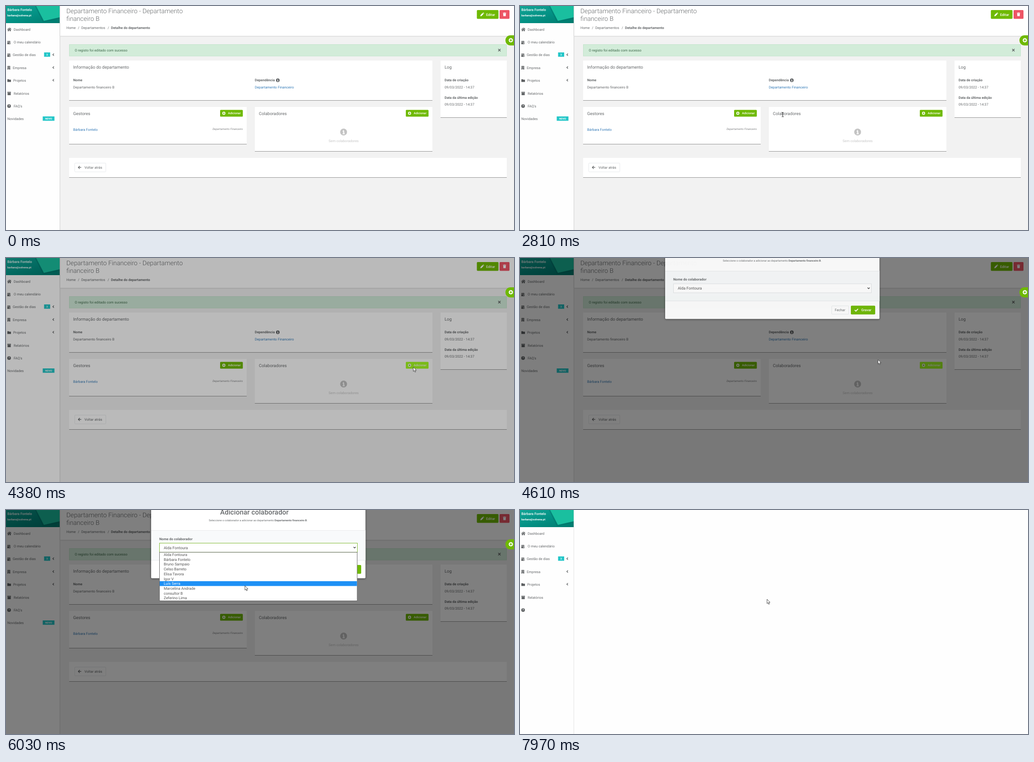
Write an HTML page that moves like this. It is 1127 by 497 pixels and loops after 8000 ms.

```html
<!DOCTYPE html>
<html lang="pt">
<head>
<meta charset="utf-8">
<title>Detalhe do departamento</title>
<style>
html, body { margin: 0; width: 100%; height: 100%; overflow: hidden; background: #fefefe; }
svg { display: block; }
text { font: 7.7px Roboto, sans-serif; fill: #676a6c; text-rendering: geometricPrecision; white-space: pre; }
.b { font-weight: 700; font-size: 7.6px; }
.h1 { font-size: 14.2px; font-weight: 300; }
.h2 { font-size: 9.5px; }
.link { fill: #337ab7; }
.w { fill: #fff; font-weight: 500; }
.add { font-size: 6.6px; }
.badge { font-size: 5.6px; font-weight: 700; fill: #fff; text-anchor: middle; }
.mid { text-anchor: middle; }
.opt { font-size: 8.4px; fill: #555; }
.card { fill: #fff; filter: drop-shadow(0 1px .5px #0006); }
.green { fill: #6fb903; }
.teal { fill: #23c6c8; }
.box { fill: #fff; stroke: #e7eaec; }
.ico { fill: #5d6062; }
.line { fill: none; stroke: #5d6062; stroke-width: 1.3; }
</style>
</head>
<body>
<svg width="1127" height="497" viewBox="0 0 1127 497">
<defs>
  <linearGradient id="teal" x2="1" y2="1">
    <stop stop-color="#12a596"/><stop offset=".5" stop-color="#039184"/><stop offset="1" stop-color="#00796d"/>
  </linearGradient>
  <g id="cal"><path fill-rule="evenodd" d="M-3.4-2.8H-2.2V-4H-1V-2.8H1V-4H2.2V-2.8H3.4V-1.2H-3.4ZM-3.4-.6H3.4V3.8H-3.4ZM.6 1V2.6H2.2V1Z"/></g>
  <path id="chev" class="line" d="M1.4-2.4L-1.2 0 1.4 2.4"/>
  <g id="plus"><circle r="3.4" fill="#fff"/><path d="M-2 0H2M0-2V2" stroke="#6fb903" stroke-width="1.2"/></g>
  <g id="info"><circle r="4"/><path d="M-.2-2.3V-1M-1-.4H.2V2M-1.2 2H1.3" stroke="#fff" stroke-width="1.1" fill="none"/></g>
</defs>

<rect width="1127" height="497" fill="#fefefe"/>
<rect x="119" width="1" height="497" fill="#e2e2e2"/>
<g id="side">
  <rect width="119" height="38" fill="url(#teal)"/>
  <path d="M64 0L82 36 119 29V0Z" fill="#00695f" opacity=".3"/>
  <path d="M67 0L84 33 119 25V0Z" fill="#1abf9f"/>
  <text x="3" y="10.7" class="w">Bárbara Fontelo</text>
  <text x="3" y="22.6" class="w" style="font-size:5.9px;font-weight:700">barbara@solvena.pt</text>
  <g class="ico">
    <path transform="translate(7.3 52)" d="M-4.7 0L0-4 2.4-2V-3.6H3.5V-1L4.7 0 4 .8 0-2.6-4 .8ZM-3.2 1L0-1.7 3.2 1V4H.9V1.6H-.9V4H-3.2Z"/>
    <use href="#cal" x="6.3" y="81"/>
    <use href="#cal" x="6.3" y="109"/>
    <path transform="translate(6.3 137)" fill-rule="evenodd" d="M-3-4H3V4H-3ZM-1.8-2.8V-1.6H-.6V-2.8ZM.6-2.8V-1.6H1.8V-2.8ZM-1.8-.6V.6H-.6V-.6ZM.6-.6V.6H1.8V-.6ZM-.7 1.8V4H.7V1.8Z"/>
    <path d="M3 162.4H6.2L7.2 163.4H11V168.6H3Z"/>
    <path d="M3 190.4H11V192.4H3ZM3.5 193H10.5V197.7H3.5Z"/>
    <circle cx="6.8" cy="222" r="4"/>
  </g>
  <text x="6.8" y="224.3" class="badge" style="font-size:6.4px">?</text>
  <text x="17" y="54.7">Dashboard</text>
  <text x="17" y="83.2">O meu calendário</text>
  <text x="15" y="111.3">Gestão de dias</text>
  <text x="15" y="139.8">Empresa</text>
  <text x="16" y="167.9">Projetos</text>
  <text x="17" y="196.6">Relatórios</text>
  <rect x="84.5" y="103" width="13.5" height="9.6" class="teal"/>
  <text x="91" y="109.9" class="badge">3</text>
  <use href="#chev" x="105" y="108"/>
  <use href="#chev" x="105" y="136.5"/>
  <use href="#chev" x="105" y="164.7"/>
</g>

<g id="page">
  <text x="17" y="224.8">FAQ's</text>
  <text x="3" y="253.2">Novidades</text>
  <rect x="81.5" y="245" width="26" height="9.6" class="teal"/>
  <text x="94.5" y="251.8" class="badge">NOVO</text>

  <rect x="120" width="1007" height="497" fill="#f2f2f2"/>
  <rect x="120" width="1007" height="66.5" fill="#fff" style="filter:drop-shadow(0 .6px .8px #0005)"/>
  <rect x="119" width="1.2" height="497" fill="#d5d5d5"/>
  <text x="134" y="15.7" class="h1">Departamento Financeiro - Departamento</text>
  <text x="134" y="32.7" class="h1">financeiro B</text>
  <text x="134" y="51.2">Home</text>
  <text x="159.5" y="51.2">/</text>
  <text x="167" y="51.2">Departamentos</text>
  <text x="225.5" y="51.2">/</text>
  <text x="233" y="51.2" class="b">Detalhe do departamento</text>

  <rect x="1044.6" y="9" width="48" height="19.6" rx="1.8" class="green"/>
  <path d="M1052.3 22.7L1052.8 20 1057.2 15.6 1059.4 17.8 1055 22.2ZM1057.8 15L1058.8 14.2 1060.8 16.2 1060 17.2Z" fill="#fff"/>
  <text x="1065" y="21.5" class="w">Editar</text>
  <rect x="1095" y="9" width="22" height="19.6" rx="1.8" fill="#ed5565"/>
  <path d="M1102.5 15H1104.7V14.4H1107.3V15H1109.5V16.2H1102.5ZM1103 16.8H1109L1108.6 22.6H1103.4Z" fill="#fff"/>

  <rect x="140.5" y="85.5" width="970" height="25.5" fill="#d2ecd9" stroke="#c1e4ca"/>
  <text x="152.5" y="100.8" style="fill:#3f6a4c">O registo foi editado com sucesso</text>
  <path d="M1092 95.3L1097.2 100.5M1097.2 95.3L1092 100.5" class="line" style="stroke-width:1.5"/>

  <rect x="140" y="121" width="806" height="88" class="card"/>
  <text x="149" y="138.8" class="h2">Informação do departamento</text>
  <text x="149" y="167.4" class="b">Nome</text>
  <text x="149" y="182.7">Departamento financeiro B</text>
  <text x="552" y="167.4" class="b">Dependência</text>
  <use href="#info" x="603" y="164.7" class="ico"/>
  <text x="552" y="182.7" class="link">Departamento Financeiro</text>

  <rect x="964" y="121" width="147" height="126" class="card"/>
  <text x="973" y="138.8" class="h2">Log</text>
  <text x="973" y="167.4" class="b">Data de criação</text>
  <text x="973" y="182.7">09/03/2022 - 14:37</text>
  <text x="973" y="205.6" class="b">Data da última edição</text>
  <text x="973" y="220.6">09/03/2022 - 14:37</text>

  <rect x="140" y="224" width="394" height="82" class="card"/>
  <text x="149" y="242" class="h2">Gestores</text>
  <rect x="475" y="230.6" width="50.4" height="14.8" rx="1.5" class="green"/>
  <use href="#plus" x="483.3" y="238"/>
  <text x="492.5" y="240.4" class="w add">Adicionar</text>
  <text x="149" y="276.6" class="link">Bárbara Fontelo</text>
  <text x="525.3" y="275.2" text-anchor="end" style="font-size:6.15px;font-style:italic;fill:#808284">Departamento Financeiro</text>

  <rect x="552" y="224" width="394" height="98" class="card"/>
  <text x="561" y="242" class="h2">Colaboradores</text>
  <rect id="addBtn" x="887" y="230.6" width="50.4" height="14.8" rx="1.5"/>
  <use href="#plus" x="895.3" y="238"/>
  <text x="904.5" y="240.4" class="w add">Adicionar</text>
  <use href="#info" transform="translate(749 279.7) scale(1.9)" fill="#c3c3c3"/>
  <text x="749" y="301.6" class="mid" style="fill:#c6c6c6">Sem colaboradores</text>

  <rect x="140" y="337" width="971" height="43" class="card"/>
  <rect x="152.5" y="348.5" width="69" height="19.5" rx="1.5" class="box"/>
  <path d="M167 358.2H160.6M163.6 355L160.4 358.2 163.6 361.4" class="line"/>
  <text x="174" y="361">Voltar atrás</text>

  <rect id="shade" width="1127" height="497"/>
  <rect x="1108" y="65" width="30" height="22.5" rx="11.2" class="green"/>
  <use href="#plus" transform="translate(1120 76) scale(1.4)"/>

  <g id="modal">
    <rect x="322" y="-40" width="475.5" height="191.5" rx="2" fill="#fff" style="filter:drop-shadow(0 1px 2px #0008)"/>
    <rect x="322" y="45" width="475.5" height="66.5" fill="#f8fafb"/>
    <path d="M322 45.5H797.5M322 111.5H797.5" stroke="#e8eaec"/>
    <text x="551" y="9.8" class="mid" style="font-size:15.3px;font-weight:500">Adicionar colaborador</text>
    <text x="559.5" y="24.6" class="mid" style="font-size:5.95px">Seleccione o colaborador a adicionar ao departamento <tspan font-weight="700">Departamento financeiro B</tspan>.</text>
    <text x="340" y="66.6" class="b">Nome do colaborador</text>
    <rect id="select" x="340.5" y="73.5" width="439" height="20" fill="#fff"/>
    <text id="value" x="350" y="86.6" class="opt" style="font-size:8.6px"></text>
    <path d="M771 82L773.4 84.4 775.8 82" class="line" style="stroke:#333"/>
    <rect x="691.5" y="122.5" width="38" height="18.5" rx="1.5" class="box"/>
    <text x="698.3" y="134.3">Fechar</text>
    <rect id="saveBtn" x="734" y="122" width="54" height="19.5" rx="2"/>
    <path d="M742.6 131.6L745.2 134.2 750 129.2" fill="none" stroke="#fff" stroke-width="1.8"/>
    <text x="757" y="134.3" class="w">Gravar</text>
  </g>
  <g id="list">
    <rect x="340.5" y="93.8" width="438.6" height="107.7" fill="#fff" stroke="#666"/>
    <rect id="mark" x="341" width="437.6" height="10.7" fill="#1e90f5"/>
  </g>
</g>

<g id="cursor">
  <path id="arrow" d="M0 0V9.6L2.2 7.6 3.8 11.2 5.4 10.4 3.8 7H6.8Z" fill="#fff" stroke="#222" stroke-width=".8"/>
  <path id="beam" d="M-2.2-4.8H-.5L0-4.3.5-4.8H2.2M0-4.3V4.3M-2.2 4.8H-.5L0 4.3.5 4.8H2.2" fill="none" stroke="#222" stroke-width="1"/>
</g>
</svg>
<script>
const LOOP = 8000, ROW = 10.72, TOP = 93.6;
const names = ['Alda Fontoura', 'Bárbara Fontelo', 'Bruno Sampaio', 'Celso Barreto', 'Elisa Tavora',
  'Igor V', 'Luís Serra', 'Marcelina Andrade', 'consultor B', 'Zeferino Lima'];
// time, x, y of the pointer
const path = [
  [140, 1036, 485], [400, 740, 330], [700, 300, 150], [800, 190, 131], [940, 149, 168],
  [1010, 150, 170], [1400, 195, 186], [1650, 240, 184], [1800, 224, 188], [1890, 214, 188],
  [2040, 222, 188], [2500, 540, 228], [2700, 605, 236], [2810, 583, 241],
  [2870, 577, 241], [3200, 549, 241], [3660, 813, 247], [3750, 850, 246], [3950, 905, 241],
  [4380, 904, 242], [4530, 850, 236], [4610, 795, 226], [4850, 610, 130], [5160, 535, 84],
  [5720, 535, 84], [5790, 534, 92], [6030, 530, 168], [6190, 532, 180],
  [6420, 534, 181], [6700, 547, 187], [7130, 547, 188], [7420, 548, 198]
];
const $ = id => document.getElementById(id);
const ramp = (t, start, length) => Math.min(1, Math.max(0, (t - start) / length));
const show = (id, on) => $(id).style.display = on ? '' : 'none';
const mix = k => `rgb(${111 + 55 * k},${185 + 70 * k},${3 + 30 * k})`;
const inside = ([x, y], l, t, r, b) => x > l && x < r && y > t && y < b;

const options = names.map((name, i) => {
  const el = document.createElementNS('http://www.w3.org/2000/svg', 'text');
  el.setAttribute('x', 350);
  el.setAttribute('y', TOP + ROW * i + 8.3);
  el.setAttribute('class', 'opt');
  el.textContent = name;
  return $('list').appendChild(el);
});

function pointer(t) {
  const i = path.findIndex(p => p[0] > t);
  if (i < 0) return path.at(-1).slice(1);
  if (i === 0) return path[0].slice(1);
  const [a, b] = [path[i - 1], path[i]], k = (t - a[0]) / (b[0] - a[0]);
  return [1, 2].map(n => a[n] + (b[n] - a[n]) * k);
}

function draw(t) {
  show('page', t < 7970);
  $('shade').style.opacity = .5 * ramp(t, 4300, 150);

  show('modal', t > 4470);
  $('modal').style.opacity = ramp(t, 4470, 150);
  $('modal').setAttribute('transform', `translate(0 ${-48 * (1 - ramp(t, 4470, 300)) ** 1.7})`);
  $('select').style.stroke = t > 5540 && t < 7200 ? '#7cb82a' : '#dfe2e4';
  $('value').textContent = names[t < 6800 ? 0 : 8];
  $('addBtn').style.fill = mix(ramp(t, 3900, 150) - ramp(t, 4700, 150));
  $('saveBtn').style.fill = mix(ramp(t, 7200, 150));

  show('list', t >= 5600 && t < 6850);
  const row = Math.min(8, Math.max(0, Math.floor((pointer(t - 30)[1] - TOP) / ROW)));
  $('mark').setAttribute('y', TOP + ROW * row);
  options.forEach((el, i) => el.style.fill = i === row ? '#fff' : '');

  const at = pointer(t);
  const onText = t < 3700 && (inside(at, 561, 234, 624, 246) || inside(at, 149, 174, 242, 186));
  show('cursor', t >= 140);
  show('arrow', !onText);
  show('beam', onText);
  $('cursor').setAttribute('transform', `translate(${at})`);
}

function tick() {
  draw(performance.now() % LOOP);
  requestAnimationFrame(tick);
}
tick();
</script>
</body>
</html>
```
